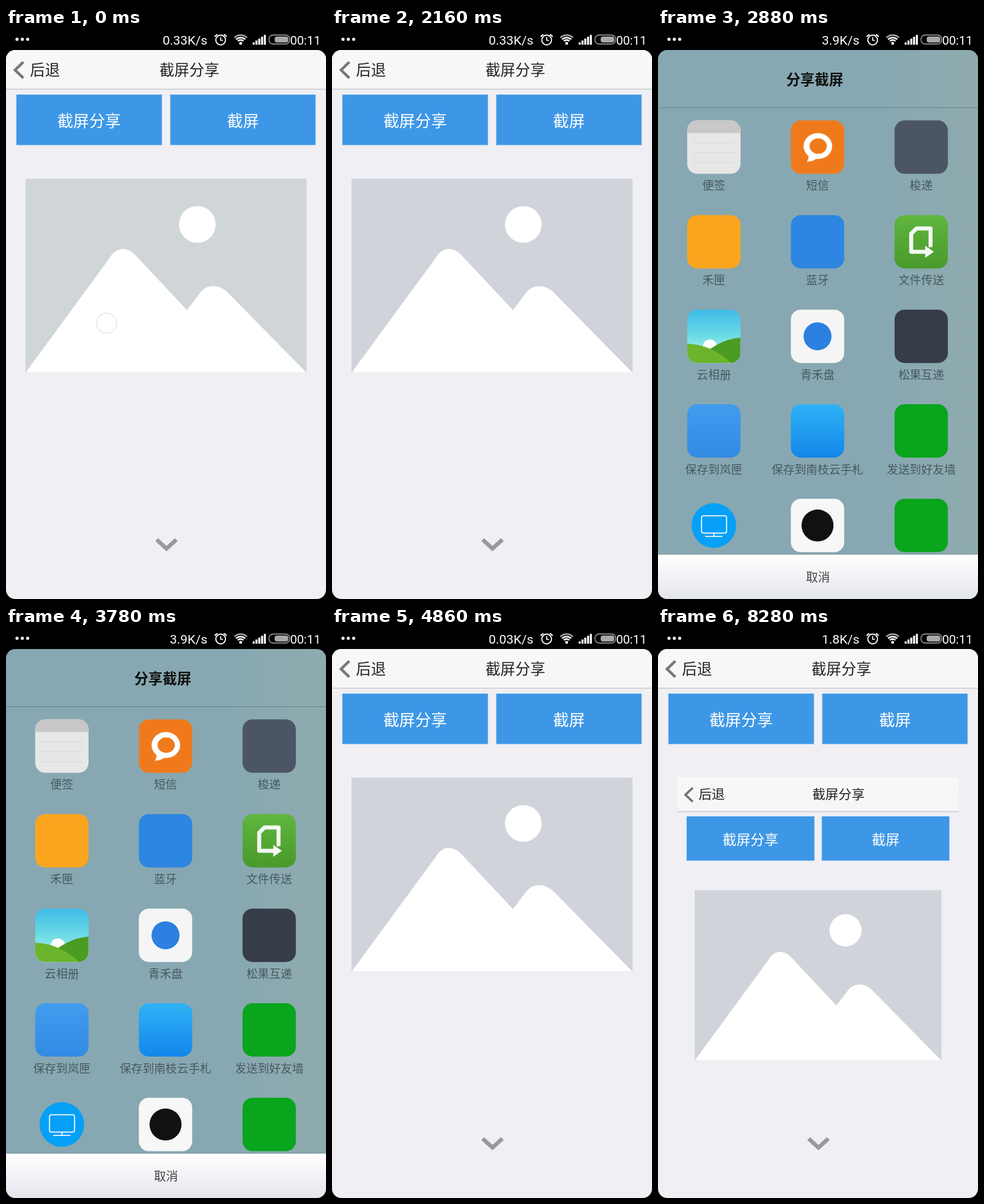
An HTML page with a canvas for the animation above (8640 ms loop, 480 by 856 pixels).

```html
<!DOCTYPE html>
<html lang="zh-CN">
<head>
<meta charset="utf-8">
<title>截屏分享</title>
<style>
html, body { margin: 0; width: 100%; height: 100%; overflow: hidden; background: #000; }
canvas { display: block; }
</style>
</head>
<body>
<canvas id="stage" width="480" height="856"></canvas>
<script>
const ctx = document.getElementById('stage').getContext('2d');
const LOOP = 8640;
const TOP = 33;
const CJK = '"Noto Sans CJK SC", "Noto Sans CJK", sans-serif';
const LATIN = 'Roboto, sans-serif';

// Times at which the screen changes, in ms.
const TOUCH_END = 180, SHEET_OPEN = 2700, SHEET_CLOSE = 4860, SHOT = 6300, SPEED_UP = 7200;

function box(x, y, w, h, r, fill) {
  ctx.beginPath();
  ctx.roundRect(x, y, w, h, r);
  ctx.fillStyle = fill;
  ctx.fill();
}

function disc(x, y, r, fill) {
  ctx.beginPath();
  ctx.arc(x, y, r, 0, Math.PI * 2);
  ctx.fillStyle = fill;
  ctx.fill();
}

function ring(x, y, r, color, width, from = 0, to = Math.PI * 2) {
  ctx.beginPath();
  ctx.arc(x, y, r, from, to);
  ctx.strokeStyle = color;
  ctx.lineWidth = width;
  ctx.stroke();
}

function line(points, color, width) {
  ctx.beginPath();
  for (const [x, y] of points) ctx.lineTo(x, y);
  ctx.strokeStyle = color;
  ctx.lineWidth = width;
  ctx.stroke();
}

function fade(y0, y1, ...colors) {
  const g = ctx.createLinearGradient(0, y0, 0, y1);
  colors.forEach((c, i) => g.addColorStop(i / Math.max(1, colors.length - 1), c));
  return g;
}

// Chinese text, centred vertically on cy.
function label(s, x, cy, size, color, align = 'center', weight = 400) {
  ctx.font = `${weight} ${size}px ${CJK}`;
  ctx.textAlign = align;
  ctx.fillStyle = color;
  ctx.fillText(s, x, cy + size * 0.37);
}

function latin(s, x, y, size) {
  ctx.font = `400 ${size}px ${LATIN}`;
  ctx.textAlign = 'right';
  ctx.fillStyle = '#fff';
  ctx.fillText(s, x, y);
}

function statusBar(speed) {
  for (let i = 0; i < 3; i++) disc(16.5 + i * 8, 17, 2.4, '#fff');
  latin(speed, 302, 24.5, 19.1);

  // alarm clock
  ring(322, 18, 7.3, '#fff', 1.7);
  line([[322, 13.5], [322, 18.5], [325.5, 18.5]], '#fff', 1.5);
  line([[313, 13], [317, 9.5]], '#fff', 2);
  line([[331, 13], [327, 9.5]], '#fff', 2);

  // wifi
  disc(352, 23, 2.2, '#fff');
  [6, 9.7, 13.4].forEach((r, i) =>
    ring(352, 24, r, i < 2 ? '#fff' : '#aaa', 2.3, -Math.PI * 0.75, -Math.PI * 0.25));

  // signal
  for (let i = 0; i < 5; i++) {
    const h = 3.5 + i * 2.8;
    box(370 + i * 4.2, 25 - h, 3, h, 0, '#fff');
  }

  // battery
  ctx.beginPath();
  ctx.roundRect(394.5, 10.5, 31, 13.5, 6);
  ctx.strokeStyle = '#a0a0a0';
  ctx.lineWidth = 1.3;
  ctx.stroke();
  box(403, 12.7, 20.5, 9, 3.5, '#a8a8a8');

  latin('00:11', 472, 24.5, 18.4);
}

function button(x, w, text) {
  box(x - 0.5, 99.5, w + 1, 76.5, 0, '#b9d5f0');
  box(x, 100, w, 75.3, 0, '#3d97e6');
  label(text, x + w / 2, 139, 23.9, '#fff');
}

function landscape(sky) {
  box(29.3, 226, 421.5, 290.5, 0, sky);
  disc(287, 294.5, 27.5, '#fff');
  ctx.beginPath();
  ctx.moveTo(29.5, 516.5);
  ctx.lineTo(155, 345.5);
  ctx.bezierCurveTo(165, 327.5, 182, 327, 195, 341.5);
  ctx.lineTo(271.5, 423);
  ctx.lineTo(290, 398.5);
  ctx.bezierCurveTo(300, 384, 318, 383.5, 332, 396);
  ctx.lineTo(450.5, 516.5);
  ctx.fillStyle = '#fff';
  ctx.fill();
}

function header() {
  box(0, TOP, 480, 91 - TOP, 0, fade(TOP, 91, '#f8f8f8', '#f6f6f7'));
  box(0, 91, 480, 1.3, 0, '#c6c7ca');
  line([[26, 51], [13.5, 63], [26, 75]], '#777', 4);
  label('后退', 36, 62.6, 22.4, '#222', 'left');
  label('截屏分享', 275, 62.6, 22.4, '#222');
}

function page(picture) {
  header();
  button(15.7, 218, '截屏分享');
  button(246.6, 217.6, '截屏');
  picture();
}

const plainPicture = () => landscape('#d0d4da');
const touchedPicture = () => {
  landscape('#d0d6d8');
  ring(151, 442.5, 15, '#e6eef1', 1.8);
};

function screenshot() {
  const k = 421.5 / 480;
  ctx.save();
  ctx.translate(29.3, 226);
  ctx.scale(k, k);
  ctx.translate(0, -TOP - 1);
  page(plainPicture);
  ctx.restore();
}

function home(t) {
  box(0, TOP, 480, 823, 0, '#efeff4');
  page(t < TOUCH_END ? touchedPicture : t < SHOT ? plainPicture : screenshot);
  line([[226, 767], [240.7, 780.5], [255.5, 767]], '#999', 6);
}

function notes() {
  box(0, 0, 80, 19, 0, '#c8c8c8');
  for (let i = 0; i < 3; i++) box(8, 33 + i * 15, 64, 1, 0, '#dadada');
}

function message() {
  ctx.beginPath();
  ctx.ellipse(40.5, 38.5, 21.5, 19.5, 0, 0, Math.PI * 2);
  ctx.fillStyle = '#fff';
  ctx.fill();
  ctx.beginPath();
  ctx.moveTo(24, 46);
  ctx.quadraticCurveTo(29, 55, 24, 62);
  ctx.quadraticCurveTo(34, 62, 41, 55);
  ctx.fill();
  ctx.beginPath();
  ctx.ellipse(41, 38.5, 13, 11.5, 0, 0, Math.PI * 2);
  ctx.fillStyle = '#f07a1b';
  ctx.fill();
}

function transfer() {
  ctx.lineJoin = 'round';
  line([[47, 55], [25, 55], [25, 28], [33, 20], [54, 20], [54, 48]], '#f4f7f2', 6);
  ctx.beginPath();
  ctx.moveTo(46, 46);
  ctx.lineTo(59, 55);
  ctx.lineTo(46, 64);
  ctx.fillStyle = '#f4f7f2';
  ctx.fill();
}

function album() {
  disc(34, 55, 10.5, '#fff');
  ctx.beginPath();
  ctx.moveTo(80, 42);
  ctx.quadraticCurveTo(56, 43, 30, 62);
  ctx.lineTo(30, 80);
  ctx.lineTo(80, 80);
  ctx.fillStyle = '#4b9c22';
  ctx.fill();
  ctx.beginPath();
  ctx.moveTo(0, 51);
  ctx.quadraticCurveTo(36, 52, 66, 80);
  ctx.lineTo(0, 80);
  ctx.fillStyle = '#6bb42c';
  ctx.fill();
}

function screenCast() {
  disc(40, 40, 33.5, '#06a0f7');
  ctx.beginPath();
  ctx.roundRect(21.5, 25.5, 37.5, 26, 3);
  ctx.strokeStyle = '#fff';
  ctx.lineWidth = 1.6;
  ctx.stroke();
  line([[40, 51], [40, 56]], '#fff', 1.6);
  line([[27, 56.5], [53, 56.5]], '#fff', 1.6);
}

// Name, tile colours from top to bottom, drawing on the tile.
const apps = [
  ['便签', ['#e7e7e7'], notes],
  ['短信', ['#f07a1b'], message],
  ['梭递', ['#4b5565']],
  ['禾匣', ['#fba51e']],
  ['蓝牙', ['#2c86e2']],
  ['文件传送', ['#60b63f', '#489a2c'], transfer],
  ['云相册', ['#3fbbe6', '#6ddbe6', '#c8f6ee'], album],
  ['青禾盘', ['#f5f5f6'], () => disc(40, 40, 21, '#2b80e0')],
  ['松果互递', ['#363c48']],
  ['保存到岚匣', ['#429cee', '#338ae4']],
  ['保存到南枝云手札', ['#30b2f5', '#1286ea']],
  ['发送到好友墙', ['#08a51d']],
  ['', null, screenCast],
  ['', ['#f7f7f7'], () => disc(40, 40, 24, '#111')],
  ['', ['#08a51d']]
];

function appIcon([name, tile, draw], i) {
  const x = 43.8 + (i % 3) * 155.5, y = 138.6 + Math.floor(i / 3) * 141.8;
  ctx.save();
  ctx.translate(x, y);
  if (tile) {
    box(0, 0, 80, 80, 15, fade(0, 80, ...tile));
    ctx.clip();
  }
  if (draw) draw();
  ctx.restore();
  if (name) label(name, x + 40, y + 97.5, 17.2, '#46585f');
}

function sheet() {
  const back = ctx.createLinearGradient(0, 0, 480, 0);
  back.addColorStop(0.7, '#87a8b2');
  back.addColorStop(1, '#8fabae');
  box(0, TOP, 480, 823, 0, back);
  label('分享截屏', 235, 77, 21.4, '#111', 'center', 700);
  box(0, 119, 480, 1, 0, '#6c8790');
  apps.forEach(appIcon);
  box(0, 788, 480, 1.5, 0, '#7f979f');
  box(0, 789.5, 480, 66.5, 0, fade(795, 856, '#fdfdfe', '#f1f2f6', '#e3e5ec'));
  label('取消', 240, 823, 18, '#444');
}

function speedAt(t) {
  if (t < SHEET_OPEN) return '0.33K/s';
  if (t < SHEET_CLOSE) return '3.9K/s';
  return t < SPEED_UP ? '0.03K/s' : '1.8K/s';
}

function render(t) {
  ctx.fillStyle = '#000';
  ctx.fillRect(0, 0, 480, 856);
  statusBar(speedAt(t));
  ctx.save();
  ctx.beginPath();
  ctx.roundRect(0, TOP, 480, 856 - TOP, 14);
  ctx.clip();
  if (t >= SHEET_OPEN && t < SHEET_CLOSE) sheet();
  else home(t);
  ctx.restore();
}

const start = performance.now();
function tick() {
  render((performance.now() - start) % LOOP);
  requestAnimationFrame(tick);
}
tick();
</script>
</body>
</html>
```
